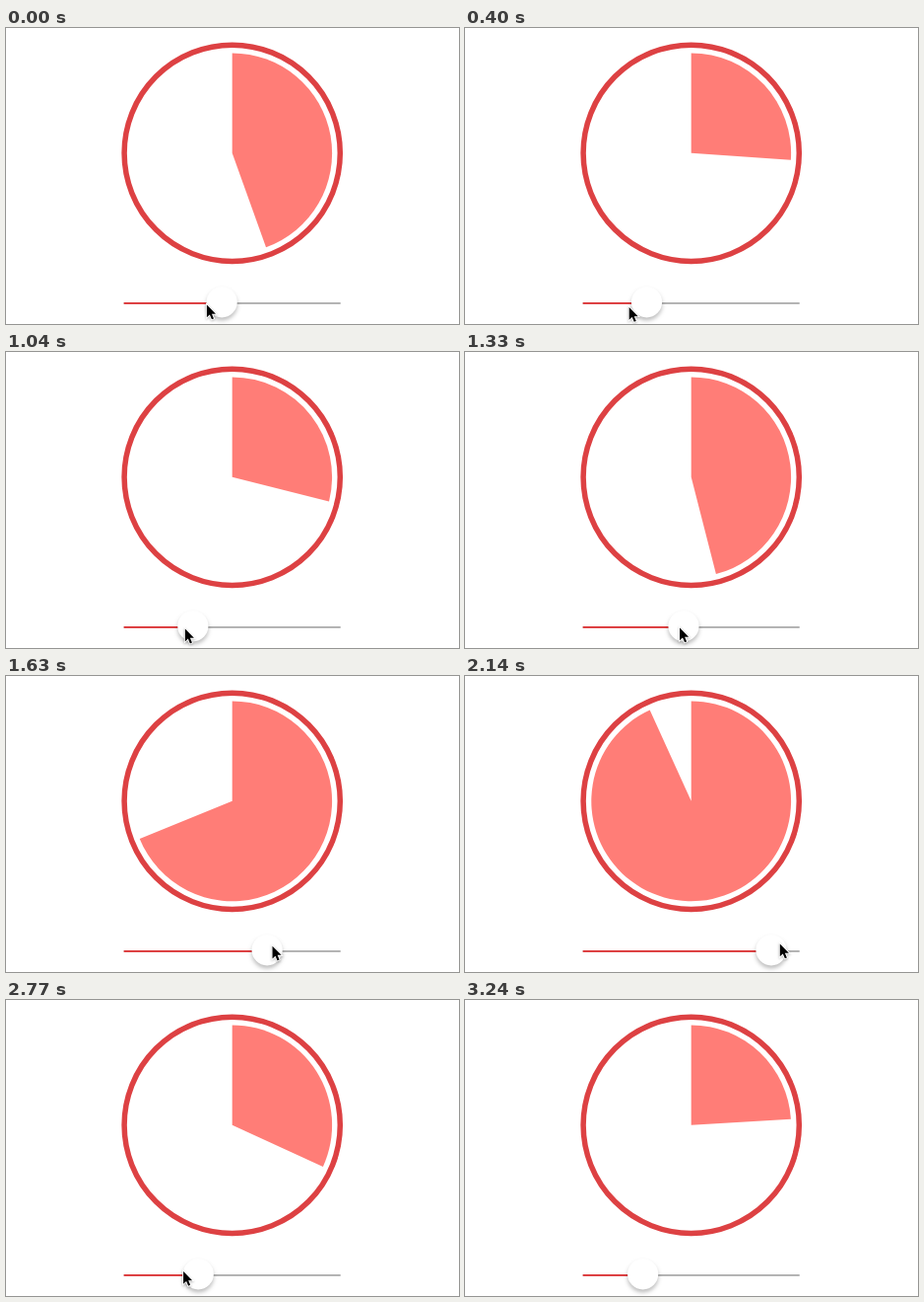
Write an HTML page that moves like this. It is 460 px wide and 300 px high and loops after 4 s.

```html
<!DOCTYPE html>
<html lang="en">
<head>
<meta charset="utf-8">
<title>Pie slider</title>
<style>
  html, body { margin: 0; width: 100%; height: 100%; overflow: hidden; background: #fff; }
  svg { display: block; width: 460px; height: 300px; }
  .thumb { filter: drop-shadow(0 3px 2.2px rgba(0, 0, 0, .26)); }
  .cursor { filter: drop-shadow(0 1px 1px rgba(0, 0, 0, .25)); }
</style>
</head>
<body>
<svg viewBox="0 0 460 300">
  <circle cx="229.7" cy="126.8" r="109.6" fill="none" stroke="#dd4143" stroke-width="5.5"/>
  <path id="pie" fill="#ff7d77"/>
  <path d="M119.7 279H339.7" stroke="#b4b4b4" stroke-width="2"/>
  <path id="track" stroke="#dd4143" stroke-width="2"/>
  <circle id="thumb" class="thumb" cy="277.8" r="15.6" fill="#fff"/>
  <path id="cursor" class="cursor" d="M0 0V12.8L3 10L5.1 14.8L7.1 13.9L5.1 9.2H9.1Z"
        fill="#000" stroke="#fff" stroke-width="1.8" paint-order="stroke"/>
</svg>
<script>
const LOOP = 4000, STEP = 57.85, LEAD = 8, HIDE = 56;
const CX = 229.7, CY = 126.8, R = 101.4;
const $ = id => document.getElementById(id);

// Drag stops: value, pointer offset from the thumb, pointer height,
// and the ease-out power of the drag that leads there.
const stops = [
  { step: 0, value: .445, dx: -15.3, y: 280.5 },
  { step: 14, value: .138, dx: -18.3, y: 283.5, power: 1.32 },
  { step: 23, value: .46, dx: -4, y: 279.5, power: 1.08 },
  { step: 37, value: .932, dx: 8.8, y: 271.5, power: 1.5 },
  { step: 51, value: .2406, dx: -15.5, y: 275, power: 1.42 },
];

const easeOut = (u, power) => 1 - (1 - u) ** power;
const mix = (a, b, f) => a + (b - a) * f;

function pose(k) {
  const i = Math.max(1, stops.findIndex(s => s.step >= k));
  const a = stops[i - 1], b = stops[i];
  const u = (k - a.step) / (b.step - a.step);
  const drag = easeOut(u, b.power);
  const hand = easeOut(u, 2 * b.power);  // the pointer runs ahead of the thumb
  return {
    value: mix(a.value, b.value, drag),
    dx: mix(a.dx, b.dx, hand),
    y: mix(a.y, b.y, hand),
  };
}

function draw(t) {
  const k = Math.floor((t + LEAD) / STEP);
  const { value, dx, y } = pose(Math.min(k, stops.at(-1).step));
  const angle = value * 2 * Math.PI, x = 135.3 + 188.5 * value;
  const tipX = CX + R * Math.sin(angle), tipY = CY - R * Math.cos(angle);
  $('pie').setAttribute('d',
    `M${CX} ${CY}V${CY - R}A${R} ${R} 0 ${value > .5 ? 1 : 0} 1 ${tipX} ${tipY}Z`);
  $('track').setAttribute('d', `M119.7 279H${x}`);
  $('thumb').setAttribute('cx', x);
  $('cursor').setAttribute('transform', `translate(${x + dx} ${y})`);
  $('cursor').setAttribute('visibility', k < HIDE ? 'visible' : 'hidden');
}

const start = performance.now();
function tick() {
  draw((performance.now() - start) % LOOP);
  requestAnimationFrame(tick);
}
tick();
</script>
</body>
</html>
```
